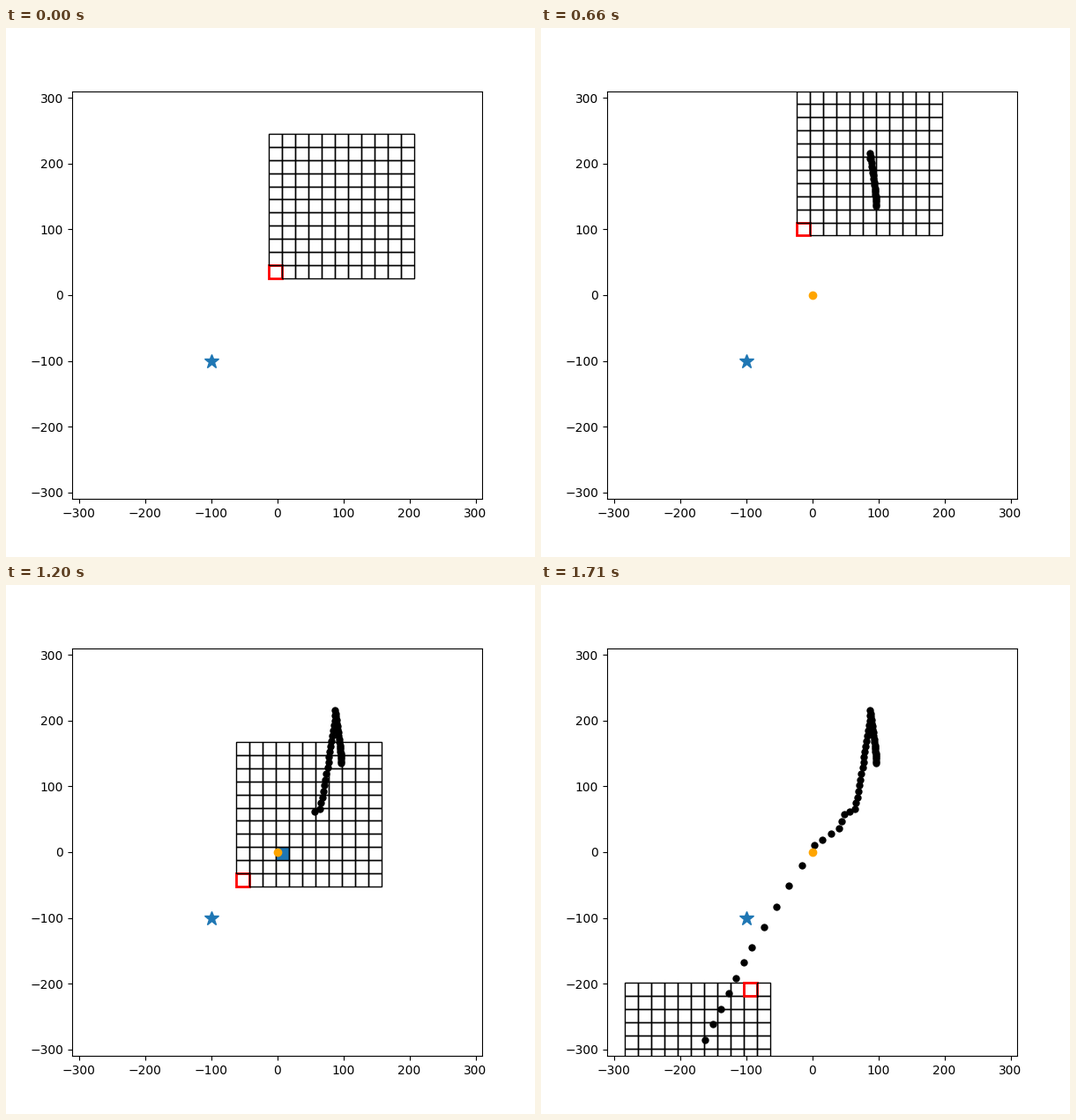
Animation of 600x600 px, one loop 1.74 s. Source, as a matplotlib script:

```python
import numpy as np
import matplotlib.pyplot as plt
from matplotlib.animation import FuncAnimation
from matplotlib.patches import Rectangle

FRAMES, INTERVAL = 58, 30
N, CELL = 11, 20
HALF = N * CELL / 2
GOAL = np.array([-100, -100])
OBSTACLE = np.array([0, 0])

# Turning points of the grid's centre (step, x, y), steady speed in between
TURNS = [
    (0, 97.3, 135.7), (9, 95.1, 162.4), (20, 87.6, 216), (22, 87, 200.6),
    (31, 76.2, 128.6), (38, 65, 65.8), (40, 48.1, 57.7), (42, 40.7, 36.2),
    (45, 3.3, 10.7), (50, -91.8, -144.9), (57, -173.1, -309),
]
when, *xy = np.transpose(TURNS)
path = np.column_stack([np.interp(np.arange(FRAMES), when, v) for v in xy])

fig, ax = plt.subplots(figsize=(6, 6), dpi=100)
ax.set_xlim(-310, 310)
ax.set_ylim(-310, 310)

ax.plot(*GOAL, "*", color="C0", ms=12, zorder=0.9)
cells = {(col, row): ax.add_patch(Rectangle((0, 0), CELL, CELL))
         for col in range(N) for row in range(N)}
trail, = ax.plot([], [], "o", color="black", mew=0, zorder=3)
obstacle, = ax.plot(*OBSTACLE, "o", color="orange", zorder=4)


def cell_at(point, corner):
    return np.floor((point - corner) / CELL).astype(int)


def update(i):
    corner = path[i] - HALF
    nearest = tuple(np.clip(cell_at(GOAL, corner), 0, N - 1))
    blocked = tuple(cell_at(OBSTACLE, corner))

    for key, cell in cells.items():
        cell.set_xy(corner + CELL * np.array(key))
        cell.set_facecolor("C0" if key == blocked else "none")
        cell.set_edgecolor("red" if key == nearest else "black")
        cell.set_linewidth(2 if key == nearest else 1)

    trail.set_data(*path[:i].T)
    obstacle.set_visible(i > 0)
    return []


anim = FuncAnimation(fig, update, frames=FRAMES, interval=INTERVAL,
                     repeat=True, repeat_delay=0, blit=False)
plt.show()
```
